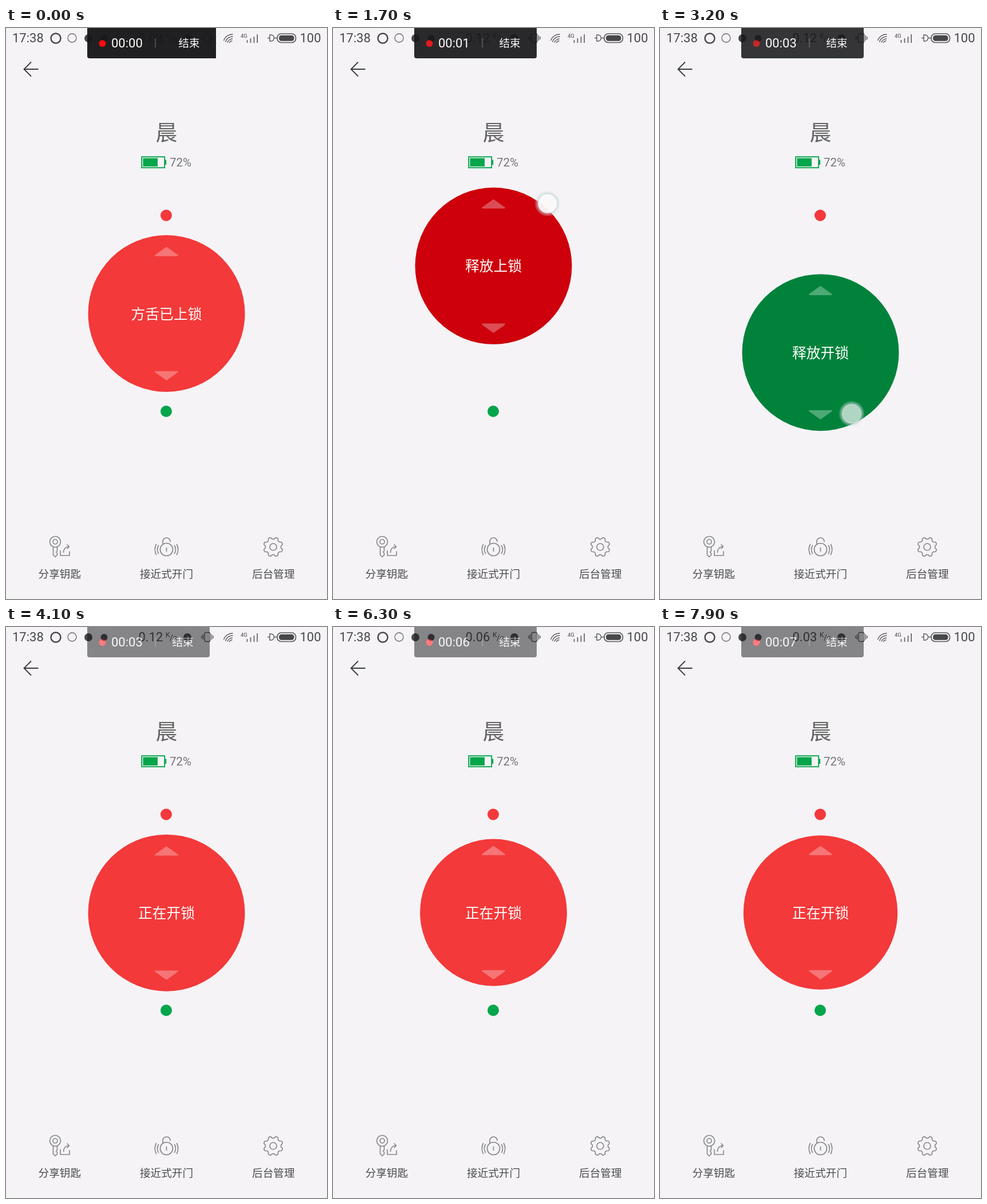
An HTML page that plays this animation: 561 by 998 pixels, repeating every 8000 ms.

```html
<!DOCTYPE html>
<html lang="zh-CN">
<head>
<meta charset="utf-8">
<style>
html, body { margin: 0; width: 100%; height: 100%; overflow: hidden; background: #f5f3f6; }
svg { display: block; width: 561px; height: 998px; }
text { font-family: Roboto, "Noto Sans CJK SC", "Noto Sans CJK", sans-serif; }
.light { font-family: Roboto, "Noto Sans CJK SC Light", "Noto Sans CJK SC", sans-serif; font-weight: 300; }
.mid { text-anchor: middle; }
.status { font-size: 22px; fill: #48484b; }
.line { fill: none; stroke: #88898c; stroke-width: 1.7; stroke-linecap: round; stroke-linejoin: round; }
.thin { fill: none; stroke: #5a5a5d; stroke-width: 1.4; }
.label { font-size: 18.6px; fill: #4c4c4e; }
</style>
</head>
<body>
<svg viewBox="0 0 561 998">
  <defs>
    <radialGradient id="halo">
      <stop offset=".66" stop-color="#c3d0d2" stop-opacity="0"/>
      <stop offset=".7" stop-color="#c3d0d2" stop-opacity=".8"/>
      <stop offset="1" stop-color="#d5dddf" stop-opacity="0"/>
    </radialGradient>
  </defs>
  <rect width="561" height="998" fill="#f5f3f6"/>

  <g class="status">
    <text x="11" y="25">17:38</text>
    <g fill="#48484b">
      <circle cx="87" cy="18" r="8.500" fill="none" stroke="#48484b" stroke-width="2.500"/>
      <circle cx="115.500" cy="17.500" r="7.500" fill="none" stroke="#6a6a6d" stroke-width="1.300"/>
      <circle cx="144" cy="18" r="7"/>
      <circle cx="171.500" cy="18" r="6"/>
      <circle cx="317" cy="18" r="7"/>
    </g>
    <text id="speed" x="231.500" y="25"></text>
    <text x="279" y="18" font-size="12">K</text>
    <text x="286" y="24" font-size="14">/s</text>
    <g class="thin">
      <rect x="347" y="9.500" width="10" height="16" rx="3"/>
      <path d="M344.500 13v9M342 15v5M359.500 13v9M362 15v5"/>
      <path d="M380.500 22a16 16 0 0 1 16-11M383.500 24.500a12.500 12.500 0 0 1 13-9.500M387 25.500a9 9 0 0 1 9-6.500M390.500 26a5 5 0 0 1 5-3.500"/>
      <path d="M421.500 26v-5M427.500 26v-8M433.500 26v-11M439.200 26v-15" stroke-width="1.600"/>
      <path d="M457 17.500h4M461 12v11h2a5.500 5.500 0 0 0 0-11zM469 17.500h5"/>
      <rect x="474" y="10" width="32.500" height="15.500" rx="7" stroke-width="1.700"/>
    </g>
    <text x="410" y="17" font-size="9.500">4G</text>
    <rect x="477" y="12.800" width="26.500" height="10" rx="4.500"/>
    <text x="513.500" y="25">100</text>
  </g>

  <path d="M56.500 72H32M44 59.500L31.500 72L44 84.500" fill="none" stroke="#3c3c3f" stroke-width="1.900"/>
  <text class="mid light" x="280.500" y="196" font-size="38" fill="#666">晨</text>
  <g fill="#05a54b">
    <rect x="237.200" y="225.200" width="40" height="19" fill="none" stroke="#05a54b" stroke-width="1.900"/>
    <rect x="239.500" y="227.500" width="25.500" height="14.500"/>
    <rect x="277.500" y="230.500" width="2.700" height="8.500"/>
  </g>
  <text x="286" y="241.500" font-size="20.500" fill="#747477">72%</text>

  <circle cx="280" cy="327.500" r="10" fill="#f4383c"/>
  <circle cx="280" cy="670" r="10" fill="#05a54b"/>

  <g id="knob">
    <circle id="disc" cx="280.500"/>
    <g fill="#fff" stroke="#fff" stroke-width="2.500" stroke-linejoin="round" opacity=".3">
      <path d="M261.500 -101.500L280.500 -115L299.500 -101.500z"/>
      <path d="M261.500 102L280.500 115.500L299.500 102z"/>
    </g>
    <text id="state" class="mid light" x="280.500" y="9.500" font-size="24.800" fill="#fff"></text>
  </g>

  <g class="line">
    <circle cx="86" cy="898" r="9.500"/>
    <circle cx="86" cy="898" r="4"/>
    <path d="M82.500 907v14l3.500 3.500l3.500-3.500v-3l-2-2l2-2v-7M95 913.500v8.500h16v-7M100.500 916.500c0-6 4-10 9.500-10M107 903l3.500 3.500l-3.500 3.500"/>
    <circle cx="280.500" cy="911.500" r="11"/>
    <path d="M274 902v-4.500a6.500 6.500 0 0 1 13 0M280.500 908.500v6"/>
    <path d="M266.500 904.500q-4 7 0 14M262.500 902.500q-4.500 9 0 18M294.500 904.500q4 7 0 14M298.500 902.500q4.500 9 0 18"/>
    <path id="gear"/>
    <circle cx="467" cy="907" r="6"/>
  </g>
  <g class="label mid">
    <text x="93.800" y="961">分享钥匙</text>
    <text x="280.500" y="961">接近式开门</text>
    <text x="467.300" y="961">后台管理</text>
  </g>

  <g id="touch">
    <circle r="23" fill="url(#halo)"/>
    <circle id="finger" r="16.500" fill="#fafafb"/>
  </g>

  <g id="bar">
    <path id="panel" fill="#18181a"/>
    <circle id="rec" cx="168.500" cy="27" r="6" fill="#ff0509"/>
    <text id="timer" x="184" y="33.500" font-size="22" fill="#fff"></text>
    <path d="M261 18v16" stroke="#555" stroke-width="1.500"/>
    <text id="end" y="32.500" font-size="18.500" fill="#fff">结束</text>
  </g>
</svg>
<script>
const LOOP = 8000, REST = 499, RADIUS = 137;
const RELEASE = 3740, PULSE_START = 4170, PULSE = 1200;
const $ = id => document.getElementById(id);
const set = (id, attrs) => {
  for (const key in attrs) $(id).setAttribute(key, attrs[key]);
};

// Linear interpolation over [time, value] pairs
function track(keys, t) {
  if (t <= keys[0][0]) return keys[0][1];
  for (let i = 1; i < keys.length; i++) {
    const [t0, a] = keys[i - 1], [t1, b] = keys[i];
    if (t < t1) return a + (b - a) * (t - t0) / (t1 - t0);
  }
  return keys[keys.length - 1][1];
}

const knobY = [[1000, REST], [1700, 416], [2000, 374], [2700, 484], [3200, 567],
  [3600, 633], [3700, 644], [RELEASE, 644], [3900, 540], [4000, 508], [4100, 499.7], [4150, REST]];
const touchX = [[600, 434], [1000, 400], [1700, 375], [3200, 335], [3700, 328]];
const touchY = [[600, 625], [1000, 509], [1700, 307], [2000, 232], [2700, 472],
  [3200, 674], [3600, 740], [3700, 750]];
const touchFade = [[550, 0], [600, 1], [RELEASE, 1], [3850, 0]];
const fingerFade = [[2000, .95], [3100, .7]];
const barFade = [[100, .96], [500, .92], [3150, .92], [3550, .5]];
const recFade = [[0, 1], [1700, .88], [3200, .72], [3500, 1]];

function knobLook(t, y) {
  if (t >= RELEASE) return ["正在开锁", "#f3393a"];
  if (y < REST - 45) return ["释放上锁", "#cd000b"];
  if (y > REST + 45) return ["释放开锁", "#00823b"];
  return ["方舌已上锁", "#f3393a"];
}

// Eight soft teeth, with a gap at the top
function drawGear() {
  let d = "";
  for (let i = 0; i < 96; i++) {
    const a = i / 96 * 2 * Math.PI;
    const r = 15.3 - 1.8 * Math.tanh(2 * Math.cos(8 * a));
    d += (i ? "L" : "M") + (467 + r * Math.cos(a)).toFixed(2) + " " + (907 + r * Math.sin(a)).toFixed(2);
  }
  set("gear", { d: d + "z" });
}

function draw(t) {
  const y = track(knobY, t);
  const phase = Math.max(0, t - PULSE_START) / PULSE * 2 * Math.PI;
  const [label, fill] = knobLook(t, y);
  set("knob", { transform: `translate(0 ${y})` });
  set("disc", { r: RADIUS * (1 - .075 * (1 - Math.cos(phase))), fill });
  $("state").textContent = label;

  set("touch", {
    transform: `translate(${track(touchX, t)} ${track(touchY, t)})`,
    opacity: track(touchFade, t)
  });
  set("finger", { opacity: track(fingerFade, t) });

  const right = track([[100, 367], [300, 356]], t);
  const corner = t < 300 ? 1 : 4;
  set("panel", { d: `M142 0H${right}V${53 - corner}q0 ${corner} ${-corner} ${corner}H146q-4 0 -4 -4z` });
  set("end", { x: right - 65.5 });
  set("bar", { opacity: track(barFade, t) });
  set("rec", { opacity: track(recFade, t) });
  $("timer").textContent = "00:0" + Math.max(0, Math.floor((t - 150) / 1000));
  $("speed").textContent = t < 1500 || t >= 7600 ? "0.03" : t < 4600 ? "0.12" : "0.06";
}

drawGear();
const start = performance.now();
function tick() {
  draw((performance.now() - start) % LOOP);
  requestAnimationFrame(tick);
}
tick();
</script>
</body>
</html>
```
